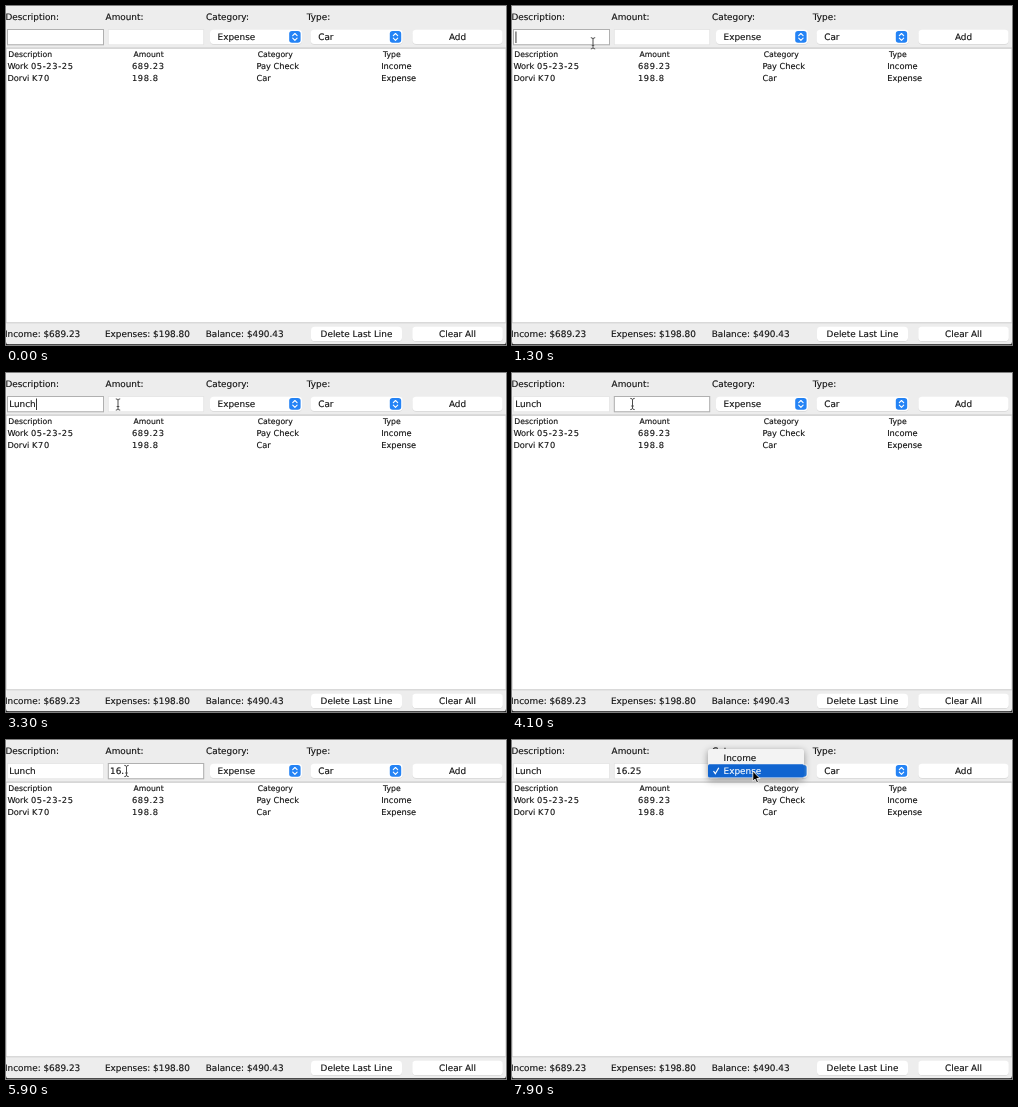
An HTML page for the animation above (8000 ms loop, 500 px wide and 339 px high).

```html
<!DOCTYPE html>
<html lang="en">
<head>
<meta charset="utf-8">
<title>Budget tracker</title>
<style>
  html, body { margin: 0; width: 100%; height: 100%; overflow: hidden; background: #ededed; }
  svg { display: block; width: 100vw; height: 100vh; }
  text {
    font: 8.9px "DejaVu Sans", sans-serif; white-space: pre; text-rendering: geometricPrecision;
    fill: #111; stroke: #111; stroke-width: .14px;
  }
  .head { font-size: 7.7px; }
  .row { font-size: 8.25px; }
  .num { letter-spacing: .65px; }
  .mid { text-anchor: middle; }
  .light { fill: #fff; stroke: #fff; }
  .popup { filter: drop-shadow(0 2.5px 3.5px rgba(0, 0, 0, .4)); }
</style>
</head>
<body>
<svg id="stage" viewBox="0 0 500 339" preserveAspectRatio="none"></svg>
<script>
const LOOP = 8000, STEP = 200;
const stage = document.getElementById("stage");

function add(tag, attrs, parent = stage) {
  const el = document.createElementNS("http://www.w3.org/2000/svg", tag);
  for (const key in attrs) el.setAttribute(key, attrs[key]);
  parent.append(el);
  return el;
}

function box(x, y, width, height, fill, more = {}, parent = stage) {
  return add("rect", { x, y, width, height, fill, ...more }, parent);
}

function label(text, x, y, cls = "", parent = stage) {
  const el = add("text", { x, y, class: cls }, parent);
  el.textContent = text;
  return el;
}

function control(x, y, width) {
  box(x, y + 0.7, width, 14.3, "#d8d8d8", { rx: 3.6 });
  box(x, y, width, 14.2, "#fff", { rx: 3.6 });
}

function button(text, x, y, width) {
  control(x, y, width);
  label(text, x + width / 2, y + 10.4, "mid");
}

function combo(text, x) {
  control(x, 23.7, 92);
  label(text, x + 7.6, 34.1);
  box(x + 79.2, 25, 11.4, 11.8, "#2483f5", { rx: 2.8 });
  add("path", {
    d: `M${x + 82.7} 29.7l2.2-2.2 2.2 2.2m-4.4 2.5l2.2 2.2 2.2-2.2`,
    fill: "none", stroke: "#fff", "stroke-width": 1.1,
    "stroke-linecap": "round", "stroke-linejoin": "round"
  });
}

function field(x, width) {
  box(x, 23.5, width, 15.3, "#fff", { stroke: "#e4e4e4", "stroke-width": 0.8 });
  const ring = box(x, 23.5, width, 15.3, "none", { stroke: "#b0b0b0" });
  const text = label("", x + 1.7, 34.1);
  const caret = box(0, 25.5, 0.9, 11.5, "#222");
  return { x, ring, text, caret };
}

function show(el, on) {
  el.setAttribute("visibility", on ? "visible" : "hidden");
}

// window and table
box(0, 0, 500, 339, "#ededed");
box(0, 42, 500, 275, "#fff");
box(0, 41.6, 500, 1, "#bdbdbd");
box(0, 316.3, 500, 1, "#c9c9c9");
box(0, 42, 0.6, 275, "#c9c9c9");
box(499.4, 42, 0.6, 275, "#d4d4d4");

label("Description:", -0.6, 13.9);
label("Amount:", 99.6, 13.9);
label("Category:", 200, 13.9);
label("Type:", 300.8, 13.9);

const about = field(1.5, 96);
const amount = field(102.3, 95.4);
combo("Expense", 204);
combo("Car", 304.6);
button("Add", 406.5, 23.7, 90);

[["Description", 2.3], ["Amount", 127.5], ["Category", 251.7], ["Type", 377]]
  .forEach(([text, x]) => label(text, x, 51.1, "head"));

function row(y, name, code, sum, category, type) {
  const first = label(name + " ", 1.4, y, "row");
  add("tspan", { class: "num" }, first).textContent = code;
  label(sum, 125.9, y, "row num");
  label(category, 250.4, y, "row");
  label(type, 375.2, y, "row");
}
row(63.4, "Work", "05-23-25", "689.23", "Pay Check", "Income");
row(75.1, "Dorvi", "K70", "198.8", "Car", "Expense");

label("Income: $689.23", -1, 331.3);
label("Expenses: $198.80", 99, 331.3);
label("Balance: $490.43", 199.7, 331.3);
button("Delete Last Line", 305, 320.8, 91);
button("Clear All", 406.3, 320.8, 90.5);

// lower window edge with rounded corners
box(0, 338, 500, 1, "#4a4a4a");
add("path", { d: "M0 335.5Q0 339 3.5 339H0ZM500 335.5Q500 339 496.5 339H500Z", fill: "#222" });

// drop-down menu
const menu = add("g", {});
box(196, 9, 96, 29.2, "#f3f3f3", { rx: 2.5, class: "popup" }, menu);
box(196, 24.3, 96, 13.2, "#1064d0", { rx: 1.5 }, menu);
label("Income", 211.6, 21.2, "", menu);
label("Expense", 211.6, 34.1, "light", menu);
add("path", { d: "M201.5 31l1.8 2.7 3.5-6", fill: "none", stroke: "#fff", "stroke-width": 1.2 }, menu);

// pointers, each drawn around its hot spot
const beam = add("g", {});
const beamPath = "M-2.2-5.6Q0-5.6 0-4.2Q0-5.6 2.2-5.6M0-4.2V4.2M-2.2 5.6Q0 5.6 0 4.2Q0 5.6 2.2 5.6M-1.3 2H1.3";
add("path", { d: beamPath, fill: "none", stroke: "#fff", "stroke-width": 2, opacity: 0.7 }, beam);
add("path", { d: beamPath, fill: "none", stroke: "#444", "stroke-width": 0.95 }, beam);
const arrow = add("g", {});
add("path", {
  d: "M0 0V10.2L2.3 8.1 3.9 11.8 5.6 11.1 4 7.5H7.2Z",
  fill: "#000", stroke: "#fff", "stroke-width": 0.8, "stroke-linejoin": "round"
}, arrow);

// [time, value...] lists: the last entry reached holds
const aboutKeys = [[0, ""], [1900, "L"], [2100, "Lu"], [2500, "Lun"], [2700, "Lunc"], [2900, "Lunch"]];
const amountKeys = [[0, ""], [4500, "1"], [4700, "16"], [5300, "16."], [6100, "16.2"], [6300, "16.25"]];
const focusKeys = [[0, about], [3500, amount], [7500, null]];
const caretKeys = [[0, false], [300, true], [700, false], [1300, true], [4100, false],
  [4500, true], [5900, false], [6100, true], [6700, false]];
const pointerKeys = [[0, null], [700, beam, 112, 92], [900, beam, 98, 62], [1100, beam, 86, 43],
  [1300, beam, 81, 37.3], [1500, beam, 79.3, 36], [3100, beam, 92, 34], [3300, beam, 112, 31.5],
  [3500, beam, 119, 31], [4100, beam, 120.5, 31], [6700, beam, 155, 32], [6900, arrow, 208, 37],
  [7100, arrow, 235.8, 31.6], [7700, arrow, 238, 33], [7900, arrow, 240.8, 31]];

function at(keys, t) {
  return keys.filter(key => key[0] <= t).pop().slice(1);
}

function setField(f, value, focused, blink) {
  f.text.textContent = value;
  show(f.ring, focused);
  show(f.caret, focused && blink);
  f.caret.setAttribute("x", f.x + 2 + (value ? f.text.getComputedTextLength() : 0));
}

function draw(t) {
  const [focus] = at(focusKeys, t), [blink] = at(caretKeys, t);
  setField(about, at(aboutKeys, t)[0], focus === about, blink);
  setField(amount, at(amountKeys, t)[0], focus === amount, blink);
  show(menu, t >= 7500);
  const [pointer, x, y] = at(pointerKeys, t);
  for (const p of [beam, arrow]) show(p, p === pointer);
  if (pointer) pointer.setAttribute("transform", `translate(${x} ${y})`);
}

// the screen refreshes every STEP ms, half a step after the start
function tick() {
  const t = performance.now() % LOOP;
  draw(Math.max(0, Math.floor((t - STEP / 2) / STEP) * STEP + STEP / 2));
  requestAnimationFrame(tick);
}
tick();
</script>
</body>
</html>
```
